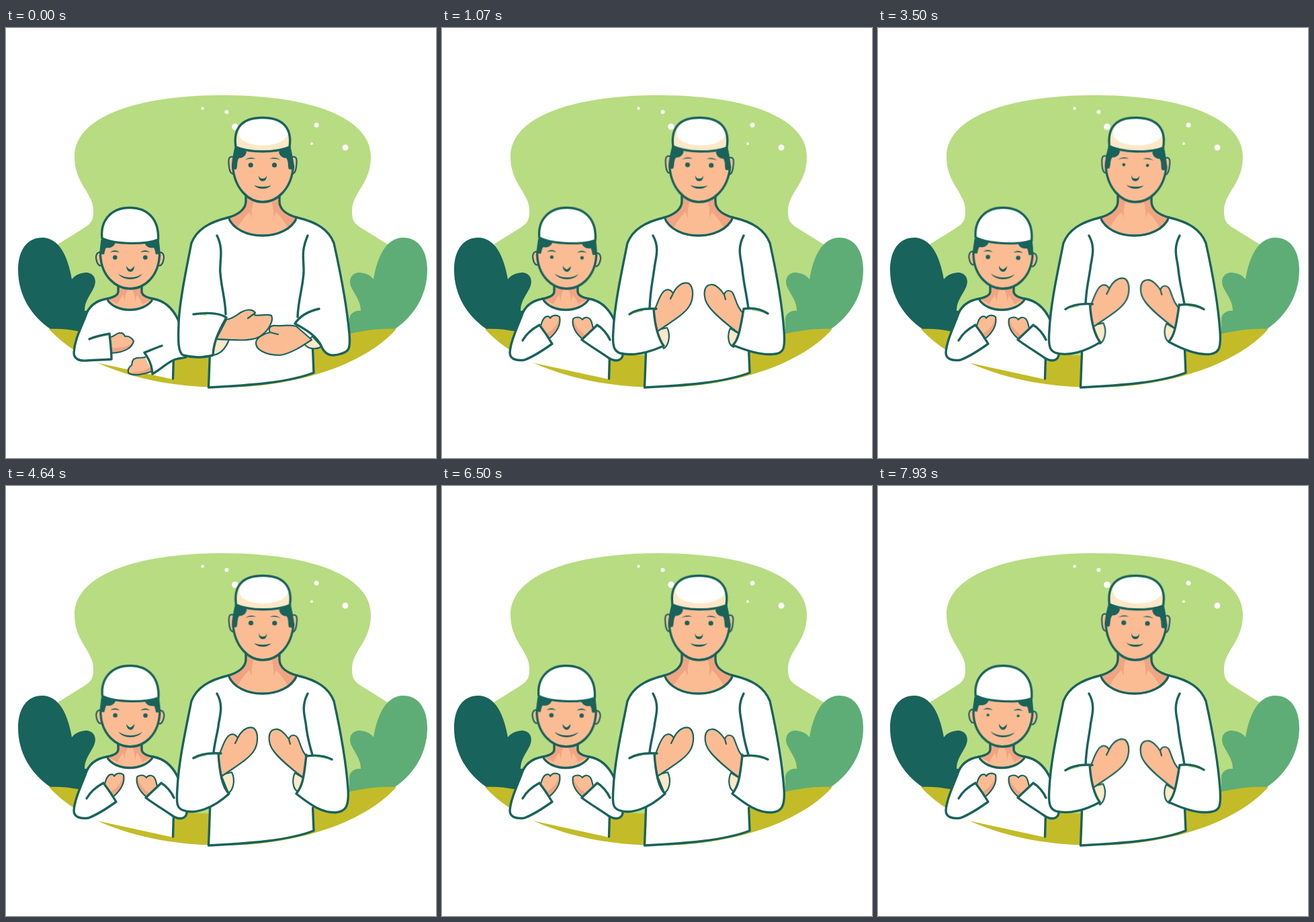
Animation, 640 px wide and 640 px high, one loop 8000 ms. Source, as an HTML page without scripts:

```html
<!DOCTYPE html>
<html lang="en">
<head>
<meta charset="utf-8">
<title>Prayer</title>
<style>
html, body { margin: 0; width: 100%; height: 100%; overflow: hidden; background: #fff; }
svg { display: block; width: 100%; height: 100%; }

.ink { fill: #18635b; }
.line { fill: none; stroke: #18635b; stroke-width: 3.4; stroke-linecap: round; stroke-linejoin: round; }
.thin { stroke-width: 2.2; }
.white { fill: #fff; }
.skin { fill: #fbbc94; }
.shade { fill: #f0a482; }
.cream { fill: #fde8c8; }

/* --a folded, --b open, --c lifted, --e nearly lowered again */
.pose { animation: pose 8s infinite; }
@keyframes pose {
  0% { d: var(--a); animation-timing-function: cubic-bezier(.37,0,.63,1); }
  13.5% { d: var(--b); }
  34.5% { d: var(--b); animation-timing-function: cubic-bezier(.37,0,.63,1); }
  57.25% { d: var(--c, var(--b)); }
  81.25% { d: var(--c, var(--b)); animation-timing-function: cubic-bezier(.375,0,.66,.725); }
  100% { d: var(--e, var(--b)); }
}
.lift { animation: lift 8s infinite; }
@keyframes lift {
  0%, 34.5% { transform: translate(0, 0); animation-timing-function: cubic-bezier(.37,0,.63,1); }
  57.25% { transform: translate(1px, -20px); }
  81.25% { transform: translate(1px, -20px); animation-timing-function: cubic-bezier(.375,0,.66,.725); }
  100% { transform: translate(0, -2px); }
}
.head { animation: sway 8s infinite; }
@keyframes sway {
  0%, 75% { transform: rotate(0deg); }
  0%, 37.5% { animation-timing-function: cubic-bezier(.37,0,.63,1); }
  37.5% { transform: rotate(2.2deg); }
  75% { animation-timing-function: cubic-bezier(.375,0,.674,.61); }
  100% { transform: rotate(1.67deg); }
}
.eye { transform-box: fill-box; transform-origin: center; animation: 8s infinite; }
.man .eye { animation-name: blink-man; }
.boy .eye { animation-name: blink-boy; }
@keyframes blink-man {
  0%, 42%, 45.5%, 100% { transform: scale(1); }
  43.75% { transform: scale(.65); }
}
@keyframes blink-boy {
  0%, 12%, 15%, 97.5% { transform: scale(1); }
  13.4% { transform: scale(.8); }
  99.1% { transform: scale(.65); }
  100% { transform: scale(.9); }
}
</style>
</head>
<body>
<svg viewBox="0 0 640 640">
  <defs>
    <path id="bush" d="M66 448C38 429 18 398 18 360C18 330 32 312 54 312C78 312 92 338 98 374C104 366 114 364 121 364C133 366 135 377 131 386C124 400 117 407 117 421C125 420 132 424 134 432V458Z"/>
  </defs>

  <path fill="#b8dc82" d="M322 100C200 100 102 130 102 192C102 232 130 245 130 272C130 289 125 292 114 299L77 322C40 350 40 420 66 448L120 490H300L520 480L578 448C605 420 605 350 568 322L531 299C520 292 515 289 515 272C515 245 543 232 543 192C543 130 445 100 322 100Z"/>
  <g class="white">
    <circle cx="292.500" cy="119.500" r="2.200"/>
    <circle cx="328.500" cy="125" r="3"/>
    <circle cx="341" cy="147" r="4.800"/>
    <circle cx="462" cy="144.500" r="3.500"/>
    <circle cx="455" cy="172" r="1.900"/>
    <circle cx="505" cy="178" r="4.500"/>
    <path d="M64 448C110 500 210 535 322 535C434 535 535 500 581 448V540H64Z"/>
  </g>
  <use href="#bush" fill="#18635b"/>
  <use href="#bush" fill="#5ead76" transform="matrix(-1 0 0 1 645 0)"/>
  <path fill="#c3bc28" d="M64 448C130 444 200 488 322 488C440 488 500 444 581 448C535 500 434 535 322 535C210 535 110 500 64 448Z"/>

  <g class="boy">
    <path class="white" d="M150 403H219L250 440L249 523L125 496L120 440Z"/>
    <path class="line" stroke-linecap="butt" d="M249.500 488L248.500 522"/>
    <path class="skin" d="M167 382V392C167 398 160 401 150 403C162 425 206 425 219 403C208 401 202 398 202 392V382Z"/>
    <g id="boy-neck" class="shade"><path d="M168 384C169 399 162 401 153 404L166 411C168 406 171 402 174 397L177 407C177 398 179 393 182 388Z"/></g>
    <use href="#boy-neck" transform="matrix(-1 0 0 1 369 0)"/>
    <path class="line" d="M167 384V392C167 398 160 401 150 403C162 425 206 425 219 403C208 401 202 398 202 392V384"/>

    <path class="skin pose" style="--a:path('M156 460C161 459 164 455 168 454C174 453 176 456 177 459C181 458 187 460 190 466C188 476 176 483 157 484Z');--b:path('M145 448C149 440 148 434 154 430C158 428 161 430 161 432C165 426 172 427 175 430C177 440 172 452 159 463Z')"/>
    <path class="shade pose" style="--a:path('M188 468C182 475 172 476 157 476L157 484C176 483 188 476 190 466Z');--b:path('M174 432C172 442 165 450 154 456L159 463C172 452 177 440 175 430Z')"/>
    <path class="line thin pose" style="--a:path('M156 460C161 459 164 455 168 454C174 453 176 456 177 459C181 458 187 460 190 466C188 476 176 483 157 484');--b:path('M145 448C149 440 148 434 154 430C158 428 161 430 161 432C165 426 172 427 175 430C177 440 172 452 159 463')"/>

    <path class="skin pose" style="--a:path('M207 490C200 492 196 489 190 493C187 496 188 499 187 502C183 504 180 510 183 514C190 518 205 516 217 511Z');--b:path('M226 449C223 443 224 437 220 433C216 429 211 431 209 434C205 429 198 430 195 433C193 443 198 455 212 465Z')"/>
    <path class="shade pose" style="--a:path('M183 514C190 512 205 512 215 505L217 511C205 516 190 518 183 514Z');--b:path('M195 433C199 445 206 453 217 459L212 465C198 455 193 443 195 433Z')"/>
    <path class="line thin pose" style="--a:path('M207 490C200 492 196 489 190 493C187 496 188 499 187 502C183 504 180 510 183 514C190 518 205 516 217 511');--b:path('M226 449C223 443 224 437 220 433C216 429 211 431 209 434C205 429 198 430 195 433C193 443 198 455 212 465')"/>

    <path class="line pose" style="fill:#fff;--a:path('M150 403C132 406 122 416 118 430C110 450 102 465 101 483C101 492 108 496 120 495C132 494 145 494 157 493C157 480 155 466 154 455M154 455C143 457 132 459 124 463');--b:path('M150 403C132 406 122 416 118 430C110 450 102 468 101 483C101 492 109 496 123 494C136 489 150 480 164 470C158 460 152 451 145 442M145 442C132 449 125 456 120 465')"/>
    <path class="line pose" style="fill:#fff;--a:path('M219 403C236 406 248 417 256 434C262 450 268 470 268 490C262 492 256 491 250 494C240 498 230 508 218 515C217 500 212 492 206 483M206 483C214 480 223 476 232 473');--b:path('M219 403C236 406 248 417 256 434C262 450 267 470 269 487C267 496 258 497 248 491C235 482 220 473 208 464C215 457 223 450 231 442M231 442C238 446 246 455 250 464')"/>

    <g class="head" style="transform-origin:185px 388px">
      <g id="boy-ear"><path class="line thin" style="fill:#fbbc94" d="M141 334C135 333 133 339 134.500 345C136 352 139 355 143 353"/></g>
      <use href="#boy-ear" transform="matrix(-1 0 0 1 369 0)"/>
      <path class="line" style="fill:#fbbc94" d="M143 316L140.500 338C142 370 164 388 184.500 388C206 388 227 370 228.500 338L226 316Z"/>
      <g id="boy-hair">
        <path class="ink" d="M143 312L163 319C161 326 155 328 149 327C147 330 147 334 146 337L139.500 336L142 316Z"/>
        <path class="ink" d="M155 334C159 330 165 330 169 334C164 332.500 159 332.500 155 334Z"/>
      </g>
      <use href="#boy-hair" transform="matrix(-1 0 0 1 369 0)"/>
      <path class="line" style="fill:#fff" d="M143 313C140 286 157 267.500 184 267.500C212 267.500 228 286 226.500 315C207 322.500 163 322.500 143 313Z"/>
      <circle class="ink eye" cx="162.300" cy="341.500" r="3.300"/>
      <circle class="ink eye" cx="207.300" cy="341.500" r="3.300"/>
      <path class="ink" d="M179 354C181 358 183 358 185 359.500C187 358 189 357 191 354C191 360 188 363 185 363C181 362 179 359 179 354Z"/>
      <path class="ink" d="M167 366C178 373 192 373 203 366C195 376.500 175 376.500 167 366Z"/>
    </g>
  </g>

  <g class="man">
    <path class="line" style="fill:#fff" d="M304 470L301.500 535C360 532 420 528 458 513L456 465"/>
    <path class="white" d="M331 282H434L470 330L456 478H304L290 330Z"/>
    <path class="skin" d="M357 248V258C357 270 345 278 331 282C345 318 418 318 433 282C418 278 407 270 407 258V248Z"/>
    <g id="man-neck" class="shade"><path d="M358 250C360 268 350 276 333 283C336 289 340 294 345 297C349 289 355 281 362 274L366 283C365 270 367 262 370 256Z"/></g>
    <use href="#man-neck" transform="matrix(-1 0 0 1 764 0)"/>
    <path class="line" d="M357 250V258C357 270 345 278 331 282C345 318 418 318 433 282C418 278 407 270 407 258V250"/>

    <g class="lift">
      <path class="line thin pose" style="fill:#fde8c8;--a:path('M311 463L332 464C328 474 320 486 307 487Z');--b:path('M319 450L335 446C341 458 337 473 330 477Z')"/>
      <path class="line thin pose" style="fill:#fde8c8;--a:path('M456 459L444 470C448 477 460 480 470 474Z');--b:path('M444 456L429 447C424 458 426 472 434 475Z')"/>
      <path class="line thin pose" style="fill:#fbbc94;--a:path('M328 434C338 433 344 426 352 422C360 418 368 419 371 424C364 432 388 424 395 428C399 436 390 450 382 456C372 467 345 465 313 463ZM371 424L360 432');--b:path('M314 424C321 412 322 400 330 392C336 387 341 390 344 395C348 386 357 377 367 380C376 386 374 405 368 414C361 426 340 438 320 452ZM344 395L340 403')"/>
      <path class="line thin pose" style="fill:#fbbc94;--a:path('M432 444C420 441 412 444 402 443C393 442 390 447 393 453C383 455 373 461 372 468C371 478 385 487 408 487C425 484 440 474 455 464ZM393 453L405 456');--b:path('M450 426C440 418 438 406 434 397C431 389 422 389 420 397C415 389 407 381 400 382C388 383 388 402 397 414C404 424 425 442 444 456ZM420 397L422 404')"/>
    </g>

    <path class="line pose" style="fill:#fff;--a:path('M331 282C302 289 284 300 276 320C267 365 258 410 257 440C256 465 256 484 264 487C282 492 295 490 308 487C309 470 314 455 328 431M279 426C300 423 318 424 328 431M314 309C325 330 317 350 319 365C321 390 326 400 327 426');--b:path('M331 282C302 289 284 300 276 320C267 365 257 410 255 450C253 476 257 481 265 484C285 489 310 482 330 473C322 462 317 445 315 418M279 426C290 418 305 417 319 418M314 309C325 328 317 345 316 358C313 380 310 390 309 417');--c:path('M331 282C302 289 284 300 276 320C267 365 257 410 255 450C253 476 256 479 262 482C280 490 308 480 332 458C322 448 318 428 316 398M279 405C290 398 305 397 320 398M314 309C325 328 317 345 316 358C313 375 310 385 309 397');--e:path('M331 282C302 289 284 300 276 320C267 365 257 410 255 450C253 476 257 481 265 484C285 489 310 482 330 471C322 460 317 443 315 416M279 424C290 416 305 415 319 416M314 309C325 328 317 345 316 358C313 380 310 390 309 415')"/>
    <path class="line pose" style="fill:#fff;--a:path('M433 282C463 289 480 300 488 320C498 365 507 410 511 455C513 478 510 482 498 485C486 489 476 488 470 475C463 458 445 448 430 440M466 418C452 421 438 428 430 440M449 309C438 335 444 345 443 365C441 390 435 405 434 430');--b:path('M433 282C463 289 480 300 488 320C498 365 506 410 509 450C511 478 508 483 497 485C480 488 455 481 433 472C440 465 443 455 449 418M485 425C474 418 462 416 449 418M449 309C438 330 446 345 447 360C449 380 453 395 456 417');--c:path('M433 282C463 289 480 300 488 320C498 365 506 410 509 450C511 478 505 485 490 486C470 486 455 476 432 458C440 448 443 440 447 400M485 407C474 401 462 400 447 402M449 309C438 330 446 345 447 360C449 375 453 390 456 400');--e:path('M433 282C463 289 480 300 488 320C498 365 506 410 509 450C511 478 508 483 496 485C479 488 455 481 433 471C440 463 443 453 449 416M485 423C474 416 462 414 449 416M449 309C438 330 446 345 447 360C449 380 453 394 456 415')"/>

    <g class="head" style="transform-origin:382px 258px">
      <g id="man-ear"><path class="line thin" style="fill:#fbbc94" d="M338 192C332 190 331 195 331.500 201C332 209 333 217 338 217"/></g>
      <use href="#man-ear" transform="matrix(-1 0 0 1 764 0)"/>
      <path class="line" style="fill:#fbbc94" d="M342 178L337.500 206C340 240 362 259 382 259C403 259 425 240 427.500 206L422 178Z"/>
      <g id="man-hair">
        <path class="ink" d="M341.500 174L358 184C357 191 351 194 347 193.500C343 198 345 206 343 210C340 211 337 211 336 208C336 195 339 184 341.500 174Z"/>
        <path class="ink" d="M355.500 197C360 192.500 367 192 371.500 195C366 194 360 194.500 355.500 197Z"/>
      </g>
      <use href="#man-hair" transform="matrix(-1 0 0 1 764 0)"/>
      <path class="cream" d="M342 177C338 150 350 133.500 382 133.500C413 133.500 426 150 422 177C402 186 362 186 342 177Z"/>
      <path class="white" d="M347 158C348 180 416 181 420 156C418 142 405 134 382 134C360 134 347 144 347 158Z"/>
      <path class="line" d="M342 177C338 150 350 133.500 382 133.500C413 133.500 426 150 422 177C402 186 362 186 342 177Z"/>
      <circle class="ink eye" cx="364.200" cy="204" r="3.600"/>
      <circle class="ink eye" cx="399.500" cy="204" r="3.600"/>
      <path class="ink" d="M376 219C377 223 379 224 382 224C385 224 387 223 388 219C388 225 386 228 382 228C378 228 376 225 376 219Z"/>
      <path class="ink" d="M369 234C377 237 387 237 395 234C389 241 375 241 369 234Z"/>
    </g>
  </g>
</svg>
</body>
</html>
```
